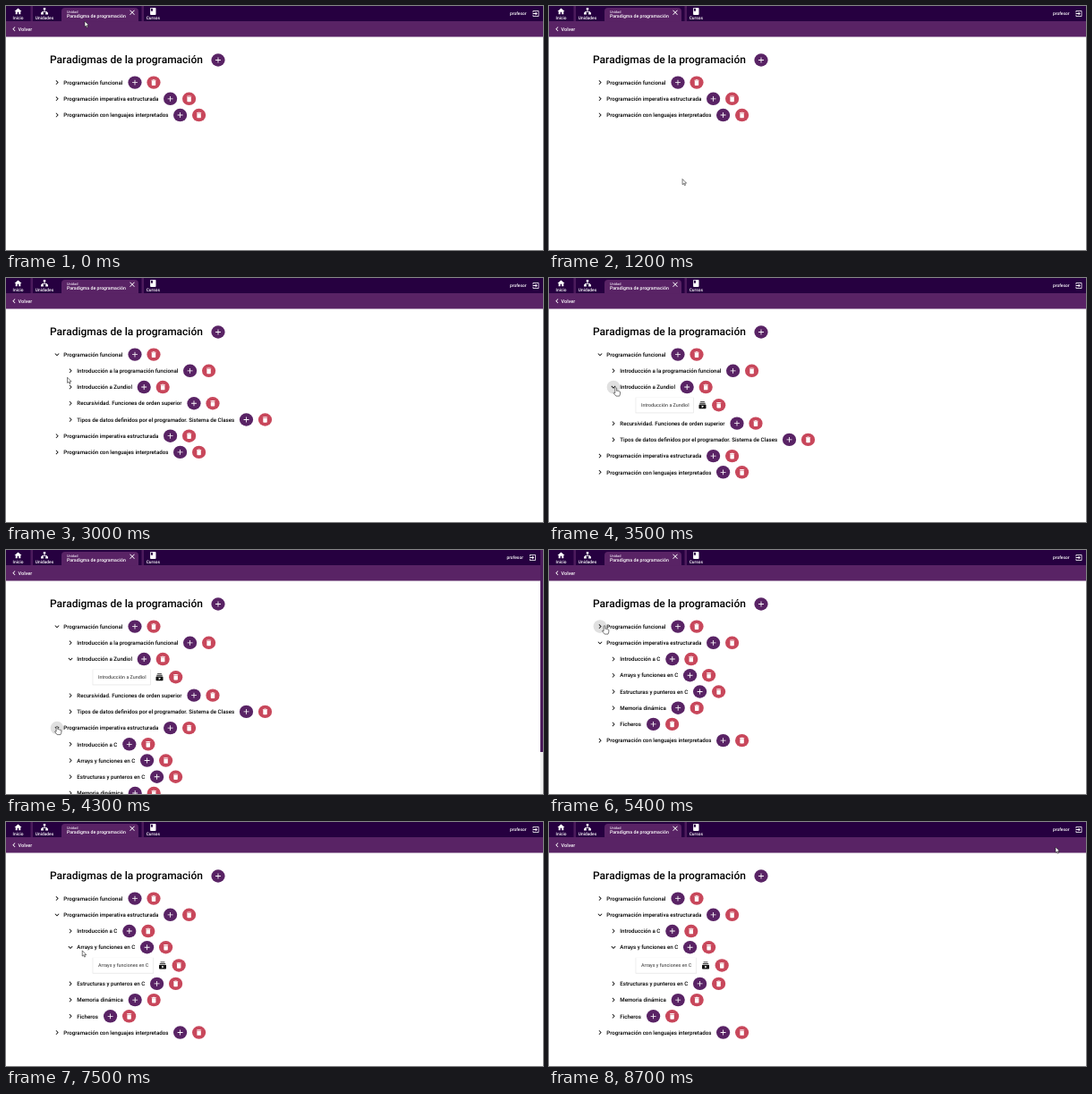
An HTML page that plays this animation: 600x273 px, repeating every 9 s.

```html
<!DOCTYPE html>
<html lang="es">
<head>
<meta charset="utf-8">
<title>Paradigmas</title>
<style>
  html, body { margin: 0; width: 100%; height: 100%; overflow: hidden; background: #fff; }
  svg { display: block; width: 100vw; height: 100vh; }
  text { font-family: Roboto, sans-serif; font-weight: 500; text-rendering: geometricPrecision; white-space: pre; }
</style>
</head>
<body>
<svg id="stage" viewBox="0 0 600 273"></svg>
<script>
const LOOP = 9000, ROW = 18.22, DETAIL = 22.4, FIRST_Y = 85.6;
const DARK = '#260040', PURPLE = '#592365', RED = '#c8475b';
const stage = document.getElementById('stage');

// Icon outlines on a 24 x 24 grid
const ICONS = {
  home: 'M10 20v-6h4v6h5v-8h3L12 3 2 12h3v8z',
  tree: 'M9 2h6v6h-2v4h6v3h3v6h-7v-6h2v-1H7v1h2v6H2v-6h3v-3h6V8H9z',
  book: 'M18 2H6c-1.1 0-2 .9-2 2v16c0 1.1.9 2 2 2h12c1.1 0 2-.9 2-2V4c0-1.1-.9-2-2-2zM6 4h5v8l-2.5-1.5L6 12z',
  close: 'M19 6.4L17.6 5 12 10.6 6.4 5 5 6.4 10.6 12 5 17.6 6.4 19 12 13.4 17.6 19 19 17.6 13.4 12z',
  exit: 'M10.1 15.6L11.5 17l5-5-5-5-1.4 1.4L12.7 11H3v2h9.7zM19 3H5a2 2 0 0 0-2 2v4h2V5h14v14H5v-4H3v4a2 2 0 0 0 2 2h14a2 2 0 0 0 2-2V5a2 2 0 0 0-2-2z',
  add: 'M19 13h-6v6h-2v-6H5v-2h6V5h2v6h6z',
  bin: 'M6 19c0 1.1.9 2 2 2h8c1.1 0 2-.9 2-2V7H6zM19 4h-3.5l-1-1h-5l-1 1H5v2h14z',
  right: 'M10 6L8.6 7.4 13.2 12l-4.6 4.6L10 18l6-6z',
  stack: 'M20 8H4V6h16zM18 2H6v2h12zM22 12v8a2 2 0 0 1-2 2H4a2 2 0 0 1-2-2v-8a2 2 0 0 1 2-2h16a2 2 0 0 1 2 2zM16 16l-6-3.3v6.6z'
};

function add(parent, tag, attrs, content) {
  const node = document.createElementNS('http://www.w3.org/2000/svg', tag);
  for (const key in attrs) node.setAttribute(key, attrs[key]);
  if (content) node.textContent = content;
  return parent.appendChild(node);
}
const group = parent => add(parent, 'g', {});
const box = (parent, x, y, width, height, fill) => add(parent, 'rect', { x, y, width, height, fill });
const label = (parent, x, y, size, fill, content, more) =>
  add(parent, 'text', { x, y, 'font-size': size, fill, ...more }, content);
const icon = (parent, name, x, y, scale, fill, turn = 0) => add(parent, 'path', {
  d: ICONS[name], fill, 'fill-rule': 'evenodd',
  transform: `translate(${x} ${y}) rotate(${turn}) scale(${scale}) translate(-12 -12)`
});
function button(parent, x, y, name) {
  const isAdd = name === 'add';
  add(parent, 'ellipse', { cx: x, cy: y, rx: 7.6, ry: 7.2, fill: isAdd ? PURPLE : RED });
  icon(parent, name, x, y, isAdd ? .42 : .37, '#fff');
}
const show = (node, visible) => node.setAttribute('display', visible ? 'inline' : 'none');
const move = (node, x, y) => node.setAttribute('transform', `translate(${x} ${y})`);

// Header
box(stage, 0, 0, 600, 17.2, DARK);
box(stage, 0, 17, 600, 17.5, PURPLE);
box(stage, 27.5, 0, 2.5, 17, '#4c1b5c');
box(stage, 151.5, 0, 2.5, 17, '#4c1b5c');
add(stage, 'path', { d: 'M62 17.5V6Q62 2 66 2H144Q148 2 148 6V17.5Z', fill: PURPLE });
const navItem = (x, name, content) => {
  icon(stage, name, x, 6, .4, '#fff');
  label(stage, x, 14.8, 4.85, '#fff', content, { 'text-anchor': 'middle' });
};
navItem(13.5, 'home', 'Inicio');
navItem(43, 'tree', 'Unidades');
navItem(164.3, 'book', 'Cursos');
label(stage, 68, 8, 4, '#e3d6e8', 'Unidad', { 'font-weight': 400 });
label(stage, 68, 13.2, 5.2, '#fff', 'Paradigma de programación');
icon(stage, 'close', 141, 7.3, .4, '#fff');
icon(stage, 'right', 9, 25.8, .42, '#fff', 180);
label(stage, 13.6, 27.9, 5.5, '#fff', 'Volver');
const account = group(stage);
label(account, 563, 10.2, 4.9, '#fff', 'profesor');
icon(account, 'exit', 592, 8.5, .38, '#fff');

label(stage, 49, 64.2, 12, '#000', 'Paradigmas de la programación');
button(stage, 237, 60.5, 'add');

// Tree: toggles are [time, becomes open]
const functional = { text: 'Programación funcional', plus: 144, toggles: [[2500, true], [5300, false]] };
const imperative = { text: 'Programación imperativa estructurada', plus: 183.6, toggles: [[4300, true]] };
const child = (parent, text, plus, toggles, detail) => ({ parent, text, plus, toggles, detail });
const rows = [
  functional,
  child(functional, 'Introducción a la programación funcional', 205.6),
  child(functional, 'Introducción a Zundiol', 154.2, [[3400, true]], 161),
  child(functional, 'Recursividad. Funciones de orden superior', 210),
  child(functional, 'Tipos de datos definidos por el programador. Sistema de Clases', 268.5),
  imperative,
  child(imperative, 'Introducción a C', 137.8),
  child(imperative, 'Arrays y funciones en C', 157.6, [[6650, true]], 164.5),
  child(imperative, 'Estructuras y punteros en C', 168.6),
  child(imperative, 'Memoria dinámica', 144.2),
  child(imperative, 'Ficheros', 116.6),
  { text: 'Programación con lenguajes interpretados', plus: 194.6 }
];

for (const row of rows) {
  row.x = row.parent ? 72 : 57;
  row.node = group(stage);
  row.ripple = add(row.node, 'circle', { cx: row.x, fill: '#e0e0e0' });
  row.closedMark = icon(row.node, 'right', row.x, 0, .42, '#111');
  row.openMark = icon(row.node, 'right', row.x, 0, .42, '#111', 90);
  label(row.node, row.x + 7.3, 2.2, 6.16, '#000', row.text);
  button(row.node, row.plus, 0, 'add');
  button(row.node, row.plus + 21, 0, 'bin');
  if (row.detail) {
    row.panel = group(row.node);
    box(row.panel, 96.7, 11.6, row.detail - 96.2, 17.6, '#dcdcdc');
    box(row.panel, 97.2, 11.4, row.detail - 97.2, 17.2, '#fff');
    label(row.panel, 103, 22, 5.35, '#555', row.text, { 'font-weight': 400 });
    icon(row.panel, 'stack', row.detail + 10.5, 20.2, .4, '#111');
    button(row.panel, row.detail + 28.7, 20.2, 'bin');
  }
}

const scrollbar = group(stage);
box(scrollbar, 597, 0, 3, 273, '#f1f1f1');
box(scrollbar, 597, 0, 3, 226, '#4c1b5c');

// Pointers, with the hot spot at 0,0
const outline = { fill: '#fff', stroke: '#222', 'stroke-width': .6, 'stroke-linejoin': 'round' };
const arrow = add(stage, 'path', { d: 'M0 0V6.2L1.4 5 2.4 7.2 3.4 6.8 2.5 4.6H4.5Z', ...outline });
const hand = add(stage, 'path', {
  d: 'M-.9 .7Q0-.5 .9 .7V3.8Q1.6 3.3 2.3 4 3 3.6 3.6 4.3 4.6 4 4.8 5V7.4L4 9.6H.2L-2.6 6.2Q-2.3 5-.9 6.2Z', ...outline
});

// Pointer stops: time, x, y
const path = [
  [0, 88, 17], [100, 88, 17], [1000, 160, 206], [2000, 56, 87.5], [2100, 56, 88], [2600, 56, 88],
  [3250, 74.7, 122.5], [3650, 74.7, 122.5], [4150, 57, 197], [4500, 57, 197],
  [5200, 62, 84.5], [5600, 62, 84.5], [6250, 75, 139.5], [6950, 75, 139.5], [7150, 81, 145],
  [7450, 81, 145], [8400, 589, 10], [8700, 566, 28], [LOOP, 566, 28]
];
function pointerAt(t) {
  const i = path.findIndex(stop => stop[0] > t);
  const [t0, x0, y0] = path[i - 1], [t1, x1, y1] = path[i];
  const u = (t - t0) / (t1 - t0), k = u * u * (3 - 2 * u);
  return [x0 + (x1 - x0) * k, y0 + (y1 - y0) * k];
}

const clamp = v => Math.max(0, Math.min(1, v));
const isOpen = (row, t) => (row.toggles || []).reduce((open, [at, state]) => t >= at ? state : open, false);

function drawRipple(row, t) {
  const click = (row.toggles || []).find(([at]) => t > at - 170 && t < at + 500);
  show(row.ripple, click);
  if (!click) return;
  const since = t - click[0];
  row.ripple.setAttribute('r', 7.4 * (1 - (1 - clamp((since + 170) / 200)) ** 3));
  row.ripple.setAttribute('opacity', clamp((500 - since) / 100));
}

function draw(t) {
  const [px, py] = pointerAt(t);
  let y = FIRST_Y, pointing = px > 585 && py < 15;
  for (const row of rows) {
    const visible = !row.parent || isOpen(row.parent, t), open = isOpen(row, t);
    show(row.node, visible);
    if (!visible) continue;
    move(row.node, 0, y);
    show(row.openMark, open);
    show(row.closedMark, !open);
    if (row.panel) show(row.panel, open);
    drawRipple(row, t);
    pointing = pointing || Math.hypot(px - row.x, py - y) < 7.5;
    y += ROW + (row.panel && open ? DETAIL : 0);
  }
  const overflows = y > 273;
  show(scrollbar, overflows);
  move(account, overflows ? -3.6 : 0, 0);
  show(hand, pointing);
  show(arrow, !pointing);
  move(pointing ? hand : arrow, px, py);
}

function tick() {
  draw(performance.now() % LOOP);
  requestAnimationFrame(tick);
}
tick();
</script>
</body>
</html>
```
